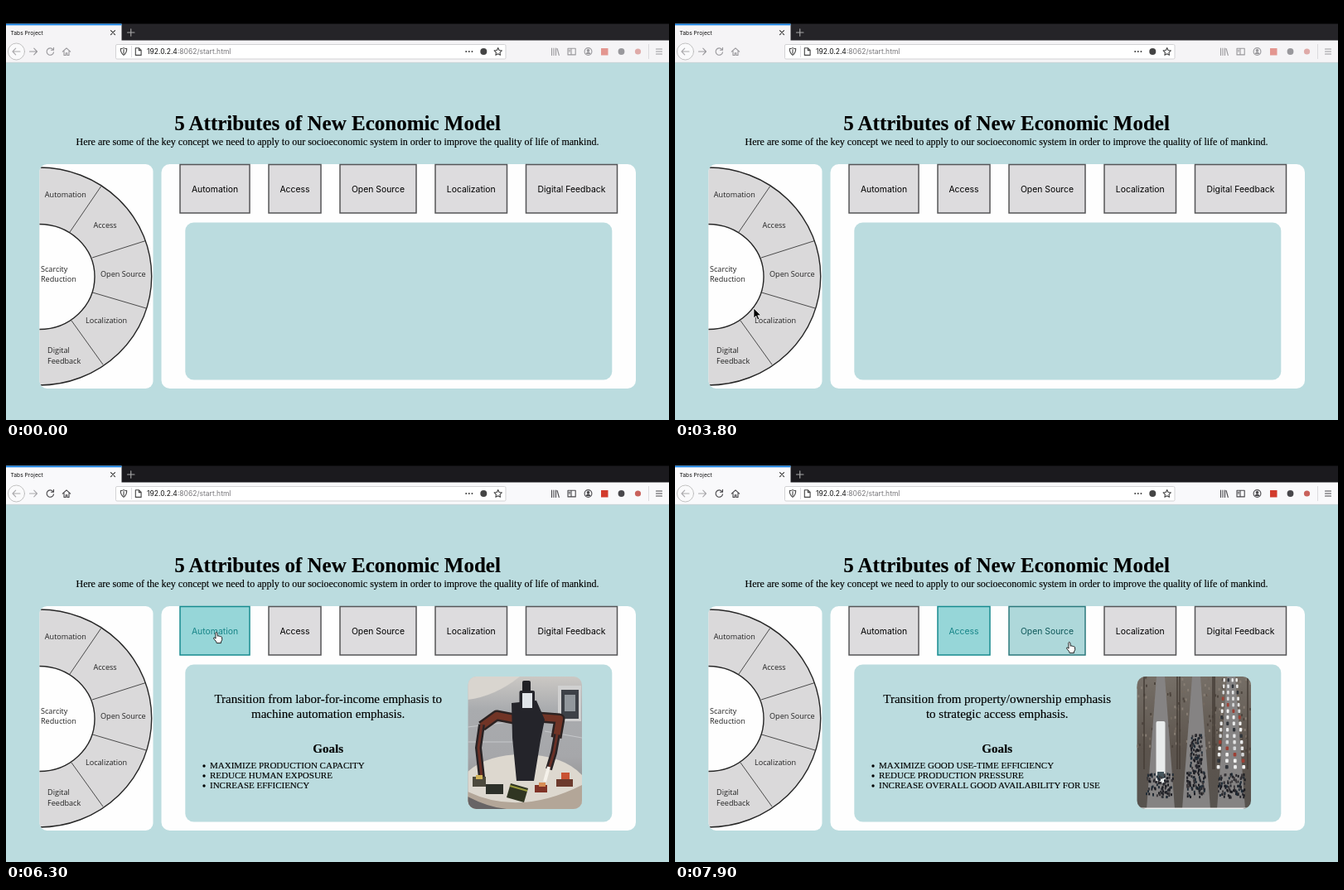
These frames come from a looping animation (800 px wide and 500 px high, 8000 ms). An HTML page:

```html
<!DOCTYPE html>
<html lang="en">
<head>
<meta charset="utf-8">
<title>Tabs</title>
<style>
  html, body { margin: 0; width: 100%; height: 100%; overflow: hidden; background: #000; }
  svg { display: block; width: 800px; height: 500px; }
  .ui { font-family: Inter, Roboto, "Liberation Sans", sans-serif; }
  .serif { font-family: "Liberation Serif", "Noto Serif", serif; }
  .serif text { stroke: #000; stroke-width: .15; }
  .label { font: 9.1px "Open Sans", "Noto Sans", sans-serif; fill: #222; }
  .mid { text-anchor: middle; }
  .icon { fill: none; stroke: currentColor; stroke-width: 1.1; stroke-linecap: round; stroke-linejoin: round; }
</style>
</head>
<body>
<svg id="stage" viewBox="0 0 800 500">
  <defs>
    <clipPath id="leftCard"><rect x="40.5" y="191" width="137" height="271" rx="9"/></clipPath>
    <clipPath id="photoClip"><rect x="557.5" y="276" width="137.5" height="160" rx="10"/></clipPath>
    <linearGradient id="wall" x2="0" y2="1">
      <stop offset="0" stop-color="#cbc8c4"/><stop offset=".25" stop-color="#a9abae"/>
      <stop offset=".6" stop-color="#a6a7aa"/><stop offset="1" stop-color="#858383"/>
    </linearGradient>
    <linearGradient id="trees" x2="0" y2="1">
      <stop offset="0" stop-color="#766f67"/><stop offset=".55" stop-color="#5c544d"/>
      <stop offset="1" stop-color="#57534f"/>
    </linearGradient>
  </defs>

  <!-- browser window -->
  <rect width="800" height="500"/>
  <rect id="tabBar" y="21.5" width="800" height="20.5"/>
  <rect id="toolbar" y="41.5" width="800" height="27.5"/>
  <rect id="tab" y="21.5" width="139.5" height="20.5"/>
  <rect y="21.5" width="139.5" height="1.8" fill="#1784e8"/>
  <text class="ui" x="5.5" y="35" font-size="6.7" fill="#111">Tabs Project</text>
  <path class="icon" color="#333" d="M126.5 29.7l5 5m0-5l-5 5"/>
  <path class="icon" color="#aaa" d="M146.5 32h8.5m-4.25-4.25v8.5"/>
  <rect x="132.5" y="46.5" width="470.5" height="17.5" rx="1.5" fill="#fff" stroke="#cfced1" stroke-width=".9"/>
  <g class="icon" color="#aaa9ac">
    <circle cx="12.5" cy="55" r="10" fill="#fafafb" stroke="#bbb" stroke-width=".9"/>
    <path d="M17 55H8m3.7-3.8L8 55l3.7 3.8"/>
  </g>
  <path id="forward" class="icon" d="M28.5 55h9m-3.7-3.8l3.7 3.8l-3.7 3.8"/>
  <g id="tools" class="icon">
    <path d="M56.5 52.3a4.2 4.2 0 1 0 1 3.5M57.5 50.2v3h-3"/>
    <path d="M68.3 55.2l4.7-4.4l4.7 4.4M70 54.5v5h2.2v-2.8h1.7v2.8H76v-5"/>
    <path d="M658.5 51v8.5m2.5-8.5v8.5m2.5-8.5v8.5m1.6-8l2.2 8"/>
    <path d="M678 51.3h9.2v7.6H678zM682 51.3v7.6m-2.7-5.7h1.3m-1.3 1.8h1.3"/>
    <circle cx="702.5" cy="55" r="4.4"/>
    <circle cx="702.5" cy="53.8" r="1.3" fill="currentColor"/>
    <path d="M700 57.5q2.5-2.2 5 0z" fill="currentColor"/>
    <path d="M784.5 52h7m-7 3h7m-7 3h7"/>
    <circle cx="742.5" cy="55" r="3.9" fill="currentColor" stroke="none"/>
  </g>
  <g id="badges" stroke="none">
    <rect x="718" y="51" width="8.5" height="8.5" fill="#d23b2c"/>
    <circle cx="762.5" cy="55" r="3.6" fill="#c9625c"/>
  </g>
  <path d="M775.5 46v18M151.5 48v14" stroke="#d5d4d8" stroke-width=".8"/>
  <g class="icon" color="#444">
    <path d="M138.3 51.6q2 0 3.7-1q1.7 1 3.7 1q0 5.5-3.7 7.8q-3.7-2.3-3.7-7.8zM142 52.5v4.8"/>
    <path d="M156.3 50.8h4.2l2.6 2.6v6h-6.8zM160.3 51v2.6h2.6"/>
    <path d="M593.7 50.6l1.4 2.9l3.2.4l-2.3 2.2l.5 3.2l-2.8-1.5l-2.8 1.5l.5-3.2l-2.3-2.2l3.2-.4z"/>
    <path d="M555.2 55h.01m3.6 0h.01m3.6 0h.01" stroke-width="2"/>
    <circle cx="576.3" cy="55" r="4" fill="currentColor" stroke="none"/>
  </g>
  <text class="ui" x="170" y="58.4" font-size="8.5" fill="#111">192.0.2.4<tspan fill="#77767a">:8062/start.html</tspan></text>

  <!-- page -->
  <rect y="68" width="800" height="432" fill="#bbdcdf"/>
  <path d="M0 68.3h800" stroke="#cfd4d6" stroke-width=".8"/>
  <g class="serif mid">
    <text x="400" y="149.6" font-size="25" font-weight="bold">5 Attributes of New Economic Model</text>
    <text x="400" y="167.5" font-size="12">Here are some of the key concept we need to apply to our socioeconomic system in order to improve the quality of life of mankind.</text>
  </g>
  <g clip-path="url(#leftCard)">
    <rect x="40" y="191" width="138" height="271" fill="#fefefe"/>
    <g stroke="#262626" stroke-width="1.4">
      <ellipse cx="40" cy="326.5" rx="135.7" ry="131.5" fill="#dad9da"/>
      <ellipse cx="40" cy="327" rx="67" ry="63.5" fill="#fefefe"/>
      <path d="M114.5 218L77 273M168.5 283.5L104 304M169 365L104.5 346M117 433L79 380" stroke-width=".8"/>
    </g>
  </g>
  <g class="label">
    <text x="46.8" y="230.8">Automation</text>
    <text x="105.5" y="268">Access</text>
    <text x="114" y="327.3">Open Source</text>
    <text x="96" y="383.3">Localization</text>
    <text x="50" y="419.3">Digital</text>
    <text x="50" y="431.5">Feedback</text>
    <text x="42" y="321">Scarcity</text>
    <text x="42" y="333.3">Reduction</text>
  </g>
  <rect x="187.5" y="191" width="572.5" height="271" rx="10" fill="#fefefe"/>
  <rect x="216.3" y="261.5" width="515" height="190" rx="10" fill="#bbdcdf"/>
  <g id="buttons" class="ui mid" font-size="10.4"></g>
  <g id="panels" class="serif"></g>

  <g id="arrow"><path d="M0 0v12l2.8-2.6l2 4.5l2-.9l-2-4.3h3.9z" fill="#000" stroke="#fff" stroke-width=".7"/></g>
  <g id="hand"><path d="M-.2 1.2q1-1.8 2 0l.5 4q1-.9 1.7.2q1-.7 1.7.4q1.3-.5 1.8.8l.2 3.2l-1.3 2.2v1.6H1.2l-.5-1.7l-3-3.6q-.5-1.7 1.1-1.3l1.3 1.2z" fill="#fff" stroke="#111" stroke-width=".9" stroke-linejoin="round"/></g>
</svg>
<script>
const $ = id => document.getElementById(id);
const LOOP = 8000, STEP = 100, FADE = 300;
const FOCUS_AT = 4600, FIRST_CLICK = 5000, SECOND_CLICK = 7300;

// on/off: when each button is highlighted
const buttons = [
  { text: "Automation", x: 210, w: 84, on: 4600, off: SECOND_CLICK },
  { text: "Access", x: 317, w: 63, on: 6500, off: LOOP },
  { text: "Open Source", x: 403, w: 92, on: 7700, off: LOOP },
  { text: "Localization", x: 518, w: 86.5 },
  { text: "Digital Feedback", x: 627.5, w: 110 }
];
const TOP = 191.5, HEIGHT = 58.5;
$("buttons").innerHTML = buttons.map(b =>
  `<rect x="${b.x}" y="${TOP}" width="${b.w}" height="${HEIGHT}" stroke-width="1.5"/>
   <text x="${b.x + b.w / 2}" y="224.8">${b.text}</text>`).join("");
const boxes = $("buttons").querySelectorAll("rect");
const captions = $("buttons").querySelectorAll("text");

let seed = 7;
const random = () => (seed = seed * 16807 % 2147483647) / 2147483647;
const rect = (x, y, w, h, fill, extra = "") =>
  `<rect x="${x}" y="${y}" width="${w}" height="${h}" fill="${fill}" ${extra}/>`;
const shape = (d, fill) => `<path d="${d}" fill="${fill}"/>`;
const line = (d, color, width) =>
  `<path d="${d}" fill="none" stroke="${color}" stroke-width="${width}" stroke-linejoin="round"/>`;
const scatter = (count, x, y, w, h, colors) => Array.from({ length: count }, (_, i) =>
  rect((x + random() * w).toFixed(1), (y + random() * h).toFixed(1), 1.9, 3, colors[i % colors.length])).join("");

function robotPhoto() {
  const upperArms = "M618 328L592 323L574 336M642 325L668 327L664 350";
  const foreArms = "M574 334L570 362L574 398M665 346L661 368L655 388";
  return rect(557, 276, 139, 161, "url(#wall)")
    + shape("M557 276H620Q590 300 557 304z", "#d9d5cf")
    + line("M557 337L615 330M557 355H615M650 342L695 350", "#c6c8cb", 1)
    + rect(666, 287, 28, 43, "#d0d0d0") + rect(670, 292, 21, 35, "#3d4147") + rect(674, 298, 13, 20, "#91979c")
    + shape("M557 391Q580 370 625 370Q673 371 695 395V436H557z", "#ddd8cf")
    + shape("M557 415Q620 445 695 407V436H557z", "#b3a698")
    + shape("M557 421Q590 438 615 436H557z", "#676465")
    + line(upperArms, "#2b2222", 13) + line(upperArms, "#713426", 8)
    + line(foreArms, "#292325", 8) + line(foreArms, "#6a3026", 3)
    + shape("M610 308L640 305L650 328L645 353L637 402H616L611 350z", "#24242a")
    + rect(623, 281, 10, 14, "#202024", 'rx="2"')
    + rect(619.5, 293, 18.5, 25, "#25252b", 'rx="2"') + rect(623, 296, 12, 18, "#e1e5e9")
    + rect(563, 397, 16, 12, "#4d4a3d") + rect(567, 395, 8, 5, "#d1b35a")
    + rect(579, 406, 21, 12, "#2d3029")
    + shape("M609 405L630 411L625 428L604 422z", "#303522")
    + line("M608 408L629 414", "#9b9c3e", 2)
    + rect(638, 407, 15, 9, "#803327") + rect(643, 404, 8, 5, "#d78d55")
    + rect(664, 400, 20, 9, "#6c3a2d") + rect(670, 392, 10, 8, "#c95132")
    + line("M655 385l-5 18", "#f5f2eb", 4);
}

function trafficPhoto() {
  const crowd = ["#18191f", "#25252b", "#3b383b", "#202b35"];
  const cars = ["#e7e8e9", "#d4d6d8", "#f1f1f0", "#30343a", "#e2e2e2", "#9d4035", "#eceded"];
  let out = rect(557, 276, 139, 161, "url(#trees)");
  out += scatter(190, 557, 276, 137, 90, ["#887e74", "#4c443d", "#746a60"]);
  for (const x of [586, 629, 671])
    out += shape(`M${x - 5} 276h10L${x + 17} 436h-34z`, "#858383")
      + line(`M${x - 20} 276v112M${x + 20} 276v112`, "#443c36", 1.5);
  out += rect(580.5, 330, 11, 75, "#e9ecec", 'rx="2"') + rect(582, 391, 8, 8, "#46565d")
    + scatter(95, 568, 392, 32, 29, crowd)
    + scatter(100, 621, 345, 14, 45, crowd) + scatter(85, 617, 390, 22, 31, crowd);
  for (let row = 0; row < 15; row++)
    for (let col = 0; col < 4; col++) {
      const spread = 5 + row * .37;
      out += rect((669 + (col - 1.5) * spread).toFixed(1), 278 + row * 7.5, 2.4 + row * .1, 4.6,
        cars[(row * 4 + col * 3) % cars.length], 'rx="1"');
    }
  return out + scatter(105, 655, 392, 32, 29, crowd) + rect(557, 434.5, 139, 2, "#eef0f0");
}

function panel(lines, goals, photo) {
  const head = lines.map((s, i) => `<text class="mid" x="388.7" y="${308 + i * 18}" font-size="15">${s}</text>`).join("");
  const list = goals.map((s, i) => `<circle cx="239" cy="${384 + i * 12}" r="1.7"/>
    <text x="246" y="${387 + i * 12}" font-size="11">${s}</text>`).join("");
  return `<g>${head}<text class="mid" x="388.7" y="367.7" font-size="15" font-weight="bold">Goals</text>
    ${list}<g clip-path="url(#photoClip)">${photo}</g></g>`;
}
$("panels").innerHTML =
  panel(["Transition from labor-for-income emphasis to", "machine automation emphasis."],
    ["MAXIMIZE PRODUCTION CAPACITY", "REDUCE HUMAN EXPOSURE", "INCREASE EFFICIENCY"], robotPhoto()) +
  panel(["Transition from property/ownership emphasis", "to strategic access emphasis."],
    ["MAXIMIZE GOOD USE-TIME EFFICIENCY", "REDUCE PRODUCTION PRESSURE", "INCREASE OVERALL GOOD AVAILABILITY FOR USE"], trafficPhoto());
const [automation, access] = $("panels").children;

// pointer stops: time, x, y
const stops = [
  [500, -12, 330], [1000, 120, 281], [1800, 225, 150], [2600, 560, 150], [2900, 560, 165],
  [3500, 115, 310], [4100, 75, 420], [4600, 251, 222], [5000, 253, 222], [6300, 253, 222],
  [6700, 345, 222], [7400, 345, 222], [7900, 475, 234]
];
function pointerAt(t) {
  const i = stops.findIndex(s => s[0] > t);
  if (i < 0) return stops[stops.length - 1].slice(1);
  if (i === 0) return [-20, 330];
  const [t0, x0, y0] = stops[i - 1], [t1, x1, y1] = stops[i];
  const u = (t - t0) / (t1 - t0), k = u * u * (3 - 2 * u);
  return [x0 + (x1 - x0) * k, y0 + (y1 - y0) * k];
}

const clamp = v => Math.max(0, Math.min(1, v));
const mix = (a, b, k) => `rgb(${a.map((v, i) => Math.round(v + (b[i] - v) * k))})`;
const show = (el, visible) => el.setAttribute("display", visible ? "inline" : "none");

function draw(t) {
  const focused = t >= FOCUS_AT;
  $("tabBar").setAttribute("fill", focused ? "#1b1a1e" : "#252428");
  $("toolbar").setAttribute("fill", focused ? "#f9f9fb" : "#f5f4f6");
  $("tab").setAttribute("fill", focused ? "#f9f9fb" : "#f5f4f6");
  $("tools").setAttribute("color", focused ? "#48474b" : "#99989c");
  $("forward").setAttribute("color", focused ? "#aaa9ac" : "#99989c");
  $("badges").setAttribute("opacity", focused ? 1 : .5);

  buttons.forEach((b, i) => {
    const k = b.on === undefined ? 0 : clamp((t - b.on) / FADE) * (1 - clamp((t - b.off) / FADE));
    boxes[i].setAttribute("fill", mix([221, 220, 222], [150, 214, 216], k));
    boxes[i].setAttribute("stroke", mix([85, 85, 87], [23, 139, 143], k));
    captions[i].setAttribute("fill", mix([0, 0, 0], [22, 132, 135], k));
  });
  show(automation, t >= FIRST_CLICK && t < SECOND_CLICK);
  show(access, t >= SECOND_CLICK);

  const [x, y] = pointerAt(t);
  const over = buttons.some(b => x >= b.x && x <= b.x + b.w && y >= TOP && y <= TOP + HEIGHT);
  show($("hand"), over);
  show($("arrow"), !over);
  $(over ? "hand" : "arrow").setAttribute("transform", `translate(${x.toFixed(1)} ${y.toFixed(1)})`);
}

function tick() {
  draw(Math.floor(performance.now() % LOOP / STEP) * STEP);
  requestAnimationFrame(tick);
}
tick();
</script>
</body>
</html>
```
